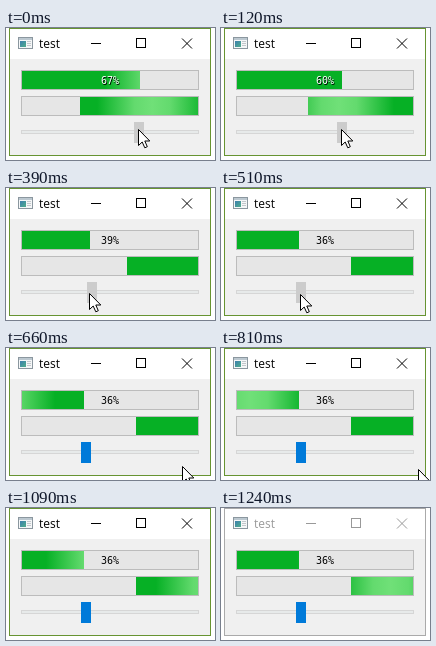
These frames come from a looping animation (209x132 px, 1340 ms). An HTML page:

```html
<!DOCTYPE html>
<html lang="en">
<head>
<meta charset="utf-8">
<title>Progress and slider</title>
<style>
  html, body { margin: 0; width: 100%; height: 100%; overflow: hidden; background: #fff; }
  svg { display: block; width: 100vw; height: 100vh; }
  .title { font: 12px "Open Sans", sans-serif; }
  .label { font: 10px "DejaVu Sans Mono", monospace; text-anchor: middle; }
  .crisp { shape-rendering: crispEdges; }
</style>
</head>
<body>
<svg viewBox="0 0 209 132">
  <defs>
    <linearGradient id="glow1" gradientUnits="userSpaceOnUse" x1="-55" x2="55" y1="0" y2="0">
      <stop offset="0" stop-color="#70e078" stop-opacity="0"/>
      <stop offset=".34" stop-color="#70e078" stop-opacity=".88"/>
      <stop offset=".5" stop-color="#70e078"/>
      <stop offset=".66" stop-color="#70e078" stop-opacity=".88"/>
      <stop offset="1" stop-color="#70e078" stop-opacity="0"/>
    </linearGradient>
    <linearGradient id="glow2" href="#glow1"/>
    <linearGradient id="teal" x2="1" y2="1">
      <stop stop-color="#3d7fb0"/>
      <stop offset="1" stop-color="#4fae8a"/>
    </linearGradient>
  </defs>

  <rect width="209" height="132" fill="#fff"/>
  <rect x="4" y="31" width="200" height="96" fill="#f0f0f0"/>
  <rect id="frame" x="3.5" y=".5" width="201" height="127" fill="none"/>

  <g class="crisp">
    <rect x="12.5" y="9.5" width="14" height="11" fill="#f5f7f8" stroke="#8b979f"/>
    <rect x="13" y="10" width="13" height="2" fill="#bcc8d0"/>
    <rect x="14" y="13" width="6" height="6" fill="url(#teal)"/>
    <path d="M21 13.5h4M21 15.5h4M21 17.5h4" stroke="#c3c8cc"/>
  </g>
  <text id="title" class="title" x="33" y="20">test</text>
  <g id="buttons" fill="none">
    <path d="M85 15.5h10"/>
    <rect x="130.5" y="10.5" width="9" height="9"/>
    <path d="M176 10.500l10 10m0-10l-10 10"/>
  </g>

  <g fill="#e6e6e6" stroke="#bcbcbc">
    <rect x="15.5" y="42.500" width="177" height="19"/>
    <rect x="15.5" y="68.5" width="177" height="19"/>
  </g>
  <g class="crisp">
    <rect id="fill1" x="16" y="43" height="18" fill="#06b025"/>
    <rect id="shine1" x="16" y="43" height="18" fill="url(#glow1)"/>
    <rect id="fill2" y="69" height="18" fill="#06b025"/>
    <rect id="shine2" y="69" height="18" fill="url(#glow2)"/>
  </g>
  <text id="shadow" class="label" x="104.8" y="56.8"/>
  <text id="label" class="label" x="104" y="56"/>

  <rect x="15.5" y="102.5" width="177" height="3" fill="#e7eaea" stroke="#d6d6d6"/>
  <rect id="handle" class="crisp" y="94" width="10" height="21"/>
  <path id="cursor" d="M.5 .5V16.500L4.200 13L6.800 18.800L9.300 17.700L6.800 12H11.800Z"
        fill="#fff" stroke="#000" stroke-linejoin="round"/>
</svg>

<script>
const LOOP = 1340;
const GLOW_START = 660;
const GLOW_SPEED = 0.235;

// Each pose holds until the next: start ms, percent, fill widths, cursor tip
const poses = [
  { at: 0,    value: 67, w1: 118, w2: 118, tip: [132, 101] },
  { at: 120,  value: 60, w1: 105, w2: 105, tip: [120, 101] },
  { at: 270,  value: 49, w1: 86,  w2: 87,  tip: [101, 103] },
  { at: 390,  value: 39, w1: 68,  w2: 71,  tip: [83, 105] },
  { at: 510,  value: 36, w1: 62,  w2: 62,  tip: [79, 106] },
  { at: 660,  value: 36, w1: 62,  w2: 62,  tip: [176, 118] },
  { at: 810,  value: 36, w1: 62,  w2: 62,  tip: [197, 121] },
  { at: 940,  value: 36, w1: 62,  w2: 62 },
  { at: 1090, value: 36, w1: 62,  w2: 62 },
  { at: 1240, value: 36, w1: 62,  w2: 62 }
];

const el = id => document.getElementById(id);
const set = (id, attrs) => {
  for (const name in attrs) el(id).setAttribute(name, attrs[name]);
};

function drawBar(n, x, width, glowX) {
  set("fill" + n, { x, width });
  set("shine" + n, { x, width });
  set("glow" + n, { gradientTransform: `translate(${glowX} 0)` });
}

function render(ms) {
  const t = ms % LOOP;
  const pose = poses.findLast(p => p.at <= t);
  const { at, value, w1, w2, tip } = pose;
  const active = at < 1240;
  const ink = active ? "#000" : "#999";

  set("frame", { stroke: active ? "#679431" : "#aaa" });
  set("title", { fill: ink });
  set("buttons", { stroke: ink });

  // The two highlights sweep in opposite directions
  const sweep = (at - GLOW_START + LOOP) % LOOP * GLOW_SPEED;
  drawBar(1, 16, w1, sweep - 6);
  drawBar(2, 192 - w2, w2, 306 - sweep);

  const covered = w1 > 86;
  el("label").textContent = el("shadow").textContent = value + "%";
  set("label", { fill: covered ? "#fff" : "#000" });
  set("shadow", { visibility: covered ? "visible" : "hidden" });

  const pressed = at < 660;
  set("handle", {
    x: Math.round(15 + 1.68 * value),
    fill: pressed ? "#ccc" : "#007ad9"
  });
  set("cursor", tip
    ? { visibility: "visible", transform: `translate(${tip})` }
    : { visibility: "hidden" });
}

const start = performance.now();
function tick() {
  render(performance.now() - start);
  requestAnimationFrame(tick);
}
tick();
</script>
</body>
</html>
```
